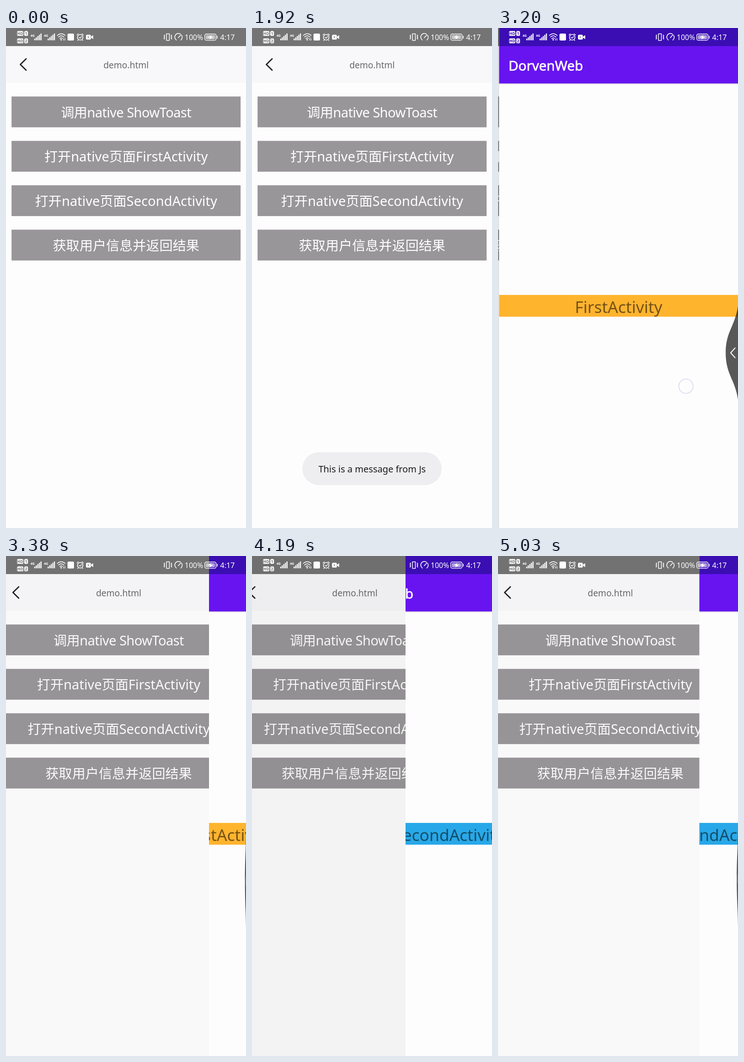
An HTML page for the animation above (5070 ms loop, 519 by 1079 pixels).

```html
<!DOCTYPE html>
<html lang="zh-CN">
<head>
<meta charset="utf-8">
<title>demo</title>
<style>
  html, body { margin: 0; width: 100%; height: 100%; overflow: hidden; background: #fefdfe; }
  svg { display: block; width: 519px; height: 1079px; }
  text { font-family: "Noto Sans", "Noto Sans CJK SC", "Noto Sans CJK", sans-serif; }
  .mid { text-anchor: middle; }
  .label { font-size: 28.8px; fill: #fff; }
  .brand { font-size: 29.2px; fill: #fff; stroke: #fff; stroke-width: .7; }
  .big { font-size: 35px; fill: #000; fill-opacity: .54; }
  .line { fill: none; stroke: #fff; stroke-width: 1.6; stroke-linecap: round; stroke-linejoin: round; }
</style>
</head>
<body>
<svg id="stage" viewBox="0 0 519 1079" xmlns="http://www.w3.org/2000/svg"></svg>
<script>
const W = 519, H = 1079, LOOP = 5070, SLIDE = 350;
const LABELS = ['调用native ShowToast', '打开native页面FirstActivity',
  '打开native页面SecondActivity', '获取用户信息并返回结果'];

const rect = (x, y, w, h, fill, extra = '') =>
  `<rect x="${x}" y="${y}" width="${w}" height="${h}" fill="${fill}" ${extra}/>`;
const text = (x, y, s, cls, extra = '') =>
  `<text x="${x}" y="${y}" class="${cls}" ${extra}>${s}</text>`;
const line = (d, extra = '') => `<path class="line" d="${d}" ${extra}/>`;

const button = (s, i) => {
  const y = i * 95.8;
  return rect(12, 147.8 + y, 495.3, 66.5, '#989698') +
    text(259.7, 192.5 + y, s, 'mid label', i ? '' : 'letter-spacing="-.6"');
};

const listPage = () =>
  rect(0, 0, W, H, '#fefdfe') + rect(0, 0, W, 39, '#747474') + rect(0, 39, W, 79.5, '#f8f8fa') +
  line('M43.5 66.5L31 78.7L43.5 91', 'style="stroke:#222;stroke-width:2.7"') +
  text(259.7, 87, 'demo.html', 'mid', 'font-size="19" fill="#69686a"') +
  LABELS.map(button).join('');

const activity = (id, name, color) =>
  `<g id="${id}">` + rect(0, 0, W, H, '#fefdfe') + rect(0, 0, W, 39, '#3a0eb3') +
  rect(0, 39, W, 80.7, '#6714f1') + rect(0, 119.7, W, 3.5, 'url(#shade)') +
  text(21.5, 91.5, 'DorvenWeb', 'brand') +
  rect(0, 576, W, 47, color) + text(259.7, 614.5, name, 'mid big') + '</g>';

const hdBadge = (n, y) => {
  const cut = 'font-size="8.5" font-weight="700" fill="#000"';
  return rect(24, y, 13.5, 10.5, '#fff', 'rx="2.5"') + rect(39.5, y, 8, 10.5, '#fff', 'rx="2.5"') +
    text(30.7, y + 8.3, 'HD', 'mid', cut) + text(43.5, y + 8.3, n, 'mid', cut);
};

const signal = x => {
  let s = text(x, 18.5, '4G', '', 'font-size="7" font-weight="700" fill="#fff"');
  for (let i = 0; i < 5; i++) {
    const h = 3.5 + i * 2.8;
    s += rect(x + 8 + i * 3.4, 26.5 - h, 2.3, h, '#fff');
  }
  return s;
};

const statusBar = () =>
  `<mask id="badges">${hdBadge(1, 6.5)}${hdBadge(2, 22.5)}</mask>` +
  rect(20, 0, 30, 39, '#fff', 'mask="url(#badges)"') + signal(53) + signal(82) +
  line('M111 16Q119.5 8.5 128 16M113.5 19.5Q119.5 14 125.5 19.5M116.3 22.8Q119.5 20 122 22.4') +
  '<circle cx="119.3" cy="25.3" r="1.6" fill="#fff"/>' +
  line('M124.5 22.5V26.5M127.5 22.5V26.5', 'style="stroke-width:1.2"') +
  rect(133, 12, 14, 15, '#fff', 'rx="2.5"') +
  '<circle cx="160.5" cy="20" r="6" class="line"/>' +
  line('M153.5 15L156.5 12.5M167.5 15L164.5 12.5M158 20L160.2 22L163.5 18.5M156 26L155 27M165 26L166 27') +
  rect(173, 14.5, 10.5, 10.5, '#fff', 'rx="2.5"') +
  '<path d="M184 18.5L188.5 15.5V24L184 21Z" fill="#fff"/>' +
  '<circle cx="178" cy="19.7" r="1.4" fill="#777"/>' +
  line('M347 12.5H353.3V26.7H347ZM343.2 15L341.7 16.8L343.2 18.6L341.7 20.4L343.2 22.2L341.7 24' +
    'M357 15L358.5 16.8L357 18.6L358.5 20.4L357 22.2L358.5 24', 'style="stroke-width:1.5"') +
  line('M368.5 26A7.6 7.6 0 0 1 377 13M380 16A7.6 7.6 0 0 1 378 26M372.5 21L378.5 14.5') +
  text(386.5, 25.8, '100%', '', 'font-size="15.6" fill="#fff"') +
  rect(429.8, 13, 24.5, 13.6, 'none', 'rx="3.5" stroke="#fff" stroke-width="1.4"') +
  rect(432, 15.2, 20, 9.2, '#fff', 'rx="1.8" opacity=".6"') +
  '<path d="M444.5 15L436 20.6H441.5L439.5 24.8L448.5 19H443Z" fill="#fff"/>' +
  rect(456, 16.5, 1.6, 6.5, '#fff', 'rx=".8"') +
  text(463, 25.8, '4:17', '', 'font-size="16" fill="#fff"');

stage.innerHTML = `
  <defs>
    <linearGradient id="shade" x2="0" y2="1">
      <stop stop-opacity=".12"/><stop offset="1" stop-opacity="0"/>
    </linearGradient>
    <clipPath id="cut"><rect id="cutBox" width="${W}" height="${H}"/></clipPath>
  </defs>
  <g id="back">${listPage()}</g>
  ${rect(0, 0, W, H, '#000', 'id="dim"')}
  <g clip-path="url(#cut)"><g id="front">
    ${activity('first', 'FirstActivity', '#ffb42e')}${activity('second', 'SecondActivity', '#28a8e8')}
  </g></g>
  ${statusBar()}
  <g id="toast">${rect(109, 915.5, 301, 71, '#eeedef', 'rx="35.5"')}
    ${text(259.7, 959, 'This is a message from Js', 'mid', 'font-size="19.8" fill="#1b1b1b"')}</g>
  <g id="edge"><path d="M0 -101C-7 -56 -27 -46 -27 0C-27 46 -7 56 0 101Z" fill="#000" fill-opacity=".65"/>
    ${line('M-6.5 -10.5L-16 0L-6.5 10.5', 'style="stroke-width:2"')}</g>
  <g id="touch"><circle r="15.5" fill="#fff" fill-opacity=".22" stroke="#6a5fb0"
    stroke-opacity=".34" stroke-width="2"/></g>`;

const $ = id => document.getElementById(id);
const [back, dim, front, first, second, cutBox, toast, edge, touch] =
  ['back', 'dim', 'front', 'first', 'second', 'cutBox', 'toast', 'edge', 'touch'].map($);

const part = (t, a, b) => Math.min(1, Math.max(0, (t - a) / (b - a)));

// cubic-bezier(.2, 0, .2, 1)
const ease = p => {
  let lo = 0, hi = 1;
  for (let i = 0; i < 24; i++) {
    const s = (lo + hi) / 2, r = 1 - s;
    if (.6 * r * s + s ** 3 < p) lo = s; else hi = s;
  }
  return lo * lo * (3 - 2 * lo);
};

const VISITS = [{ open: 2257, close: 3193 }, { open: 4117, close: 4846 }];
const TAPS = [[120, 400, 183], [1920, 405, 275], [3780, 426, 363]];
const SWIPES = [{ down: 2935, up: 3193, y: 701 }, { down: 4588, up: 4846, y: 697 }];

const show = (el, alpha, transform) => {
  el.setAttribute('opacity', alpha);
  if (transform) el.setAttribute('transform', transform);
};

function slide(t) {
  const i = t < 3800 ? 0 : 1, v = VISITS[i];
  const shown = ease(part(t, v.open, v.open + SLIDE)) - ease(part(t, v.close, v.close + SLIDE));
  const x = W * (1 - shown);
  cutBox.setAttribute('x', x);
  front.setAttribute('transform', `translate(${x / 2})`);
  back.setAttribute('transform', `translate(${-.2 * W * shown})`);
  show(dim, .105 * shown);
  show(first, 1 - i);
  show(second, i);
}

function fingers(t) {
  let alpha = 0, x = 0, y = 0, pull = 0, edgeY = 700;
  for (const [t0, tx, ty] of TAPS) {
    if (t < t0 || t > t0 + 300) continue;
    alpha = part(t, t0, t0 + 60) * (1 - part(t, t0 + 200, t0 + 300));
    [x, y] = [tx, ty];
  }
  for (const s of SWIPES) {
    if (t < s.down || t > s.up + 210) continue;
    const k = part(t, s.down, s.up) ** 1.3;
    alpha = 1 - part(t, s.up - 30, s.up + 60);
    [x, y] = [518 - 111.5 * k, s.y + 72 * k];
    pull = Math.min(1, k * 1.5) * (1 - part(t, s.up + 5, s.up + 205));
    edgeY = s.y;
  }
  show(touch, alpha, `translate(${x} ${y})`);
  show(edge, pull > .01 ? 1 : 0, `translate(${W} ${edgeY}) scale(${Math.max(pull, .01)} 1)`);
}

function frame() {
  const t = performance.now() % LOOP;
  slide(t);
  fingers(t);
  const on = part(t, 350, 510) * (1 - part(t, 2270, 2453));
  show(toast, on, `translate(0 ${8 * (1 - on)})`);
  requestAnimationFrame(frame);
}
frame();
</script>
</body>
</html>
```
